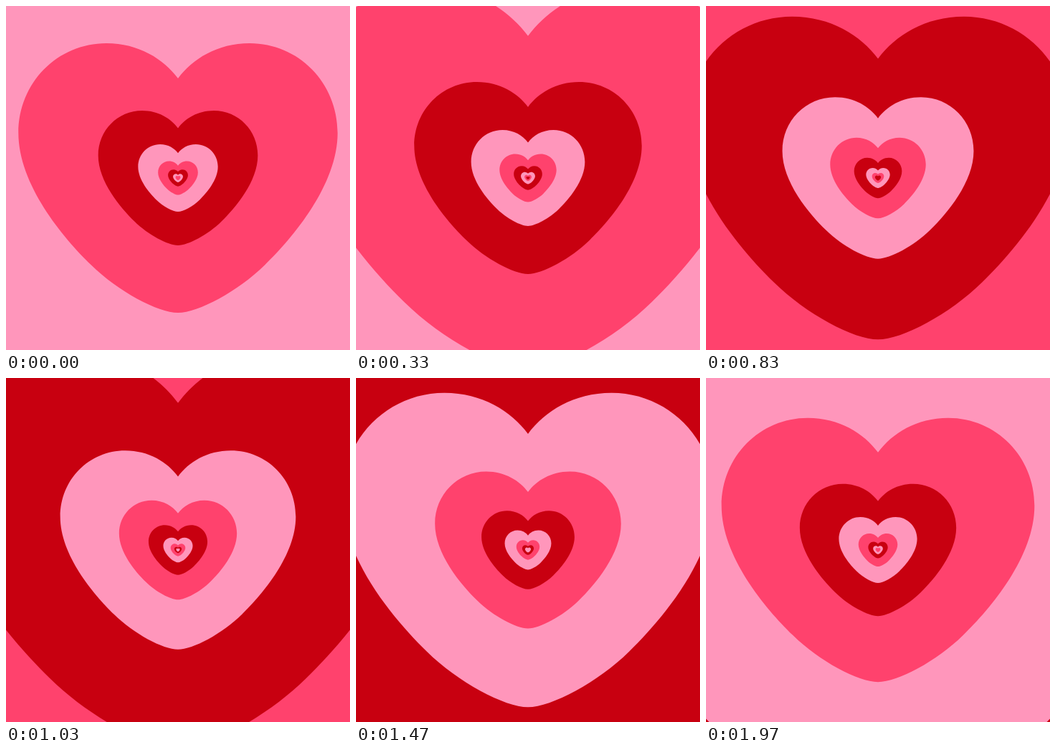
An HTML page that plays this animation: 480 by 480 pixels, repeating every 2.01 s.

```html
<!DOCTYPE html>
<html lang="en">
<head>
<meta charset="utf-8">
<title>Endless hearts</title>
<style>
  html, body { margin: 0; width: 100%; height: 100%; overflow: hidden; background: #c80010; }
  svg { display: block; width: 100%; height: 100%; }
</style>
</head>
<body>
<svg id="stage" viewBox="0 0 480 480"></svg>
<script>
const LOOP = 2010;
const FRAMES = 60;
const FIRST = -2, LAST = 10;
const SMALLEST = 1 / 100;
const COLORS = ['#ff426d', '#c80010', '#ff96bb'];

// Right half of the heart from notch to tip, centred on the zoom point.
const START = [0, -139];
const CURVES = [
  [[20, -166], [55, -188], [100, -188]],
  [[168, -188], [222.7, -133], [222.7, -63]],
  [[222.7, 9], [161, 82.7], [121, 121.5]],
  [[84, 158], [28, 188], [0, 188]]
];

function heartPath() {
  const right = [START, ...CURVES.flat()];
  const left = right.map(([x, y]) => [-x, y]).reverse().slice(1);
  return `M${START} C${right.slice(1).join(' ')} ${left.join(' ')}Z`;
}

const stage = document.getElementById('stage');
const outline = heartPath();
const hearts = [];
for (let k = FIRST; k <= LAST; k++) {
  const path = document.createElementNS('http://www.w3.org/2000/svg', 'path');
  path.setAttribute('d', outline);
  path.setAttribute('fill', COLORS[(k + 3) % 3]);
  stage.append(path);
  hearts.push({ k, path });
}

const frameStart = n => 10 * Math.round(n * 10 / 3);

// Number of size doublings since the loop began, stepped at 30 fps.
function zoomAt(time) {
  let n = Math.min(FRAMES - 1, Math.round(time * 0.03));
  if (frameStart(n) > time) n--;
  return n > 0 ? frameStart(n) * 3 / 2000 + 0.0165 : 0;
}

function render(time) {
  const zoom = zoomAt(time % LOOP);
  for (const { k, path } of hearts) {
    const scale = 2 ** (zoom - k);
    path.setAttribute('transform', `translate(240 240) scale(${scale})`);
    path.setAttribute('display', scale < SMALLEST ? 'none' : 'inline');
  }
}

const began = performance.now();
function tick() {
  render(performance.now() - began);
  requestAnimationFrame(tick);
}
tick();
</script>
</body>
</html>
```
